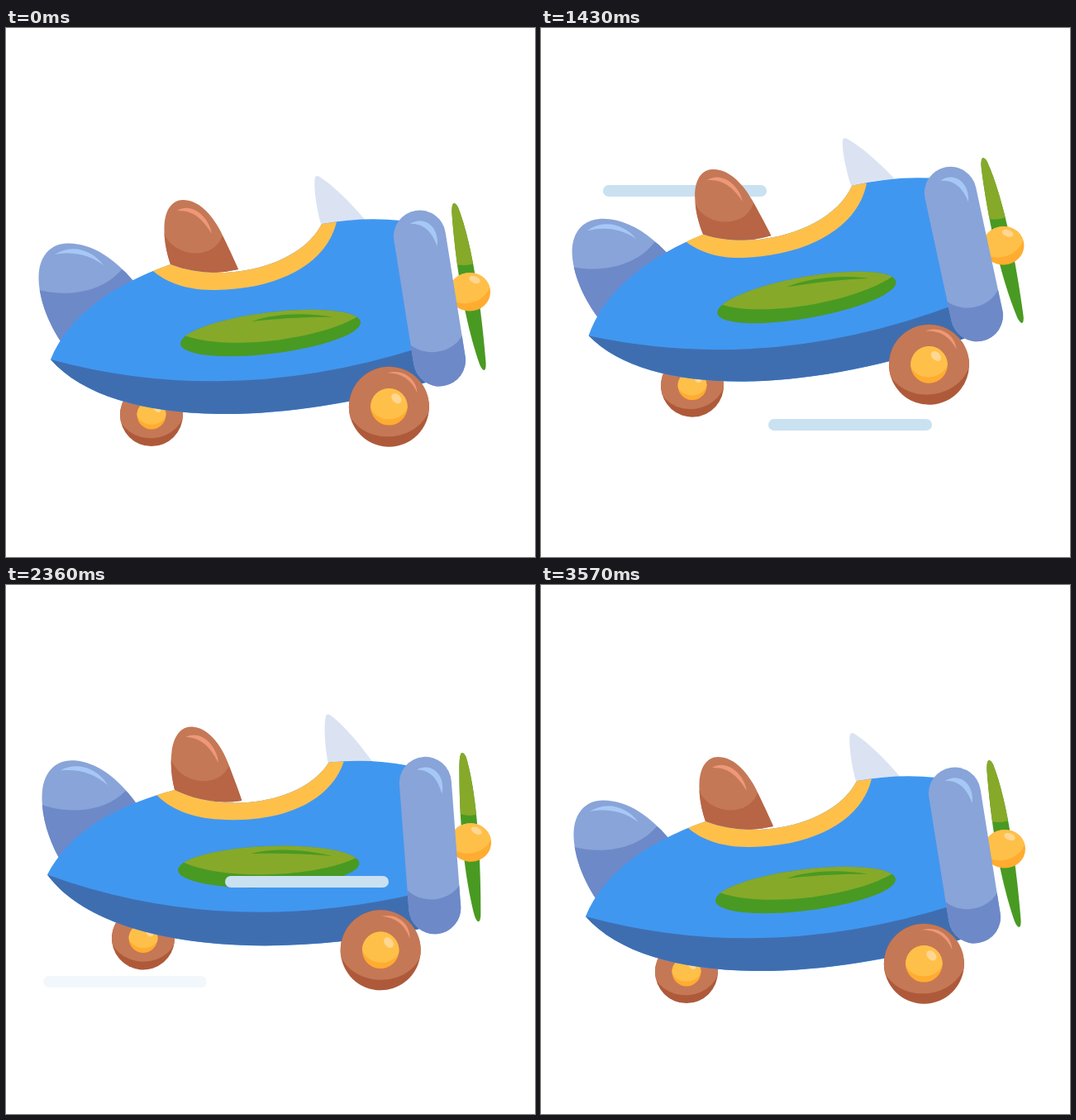
Animation, 640 px wide and 640 px high, one loop 3640 ms. Source, as an HTML page:

```html
<!DOCTYPE html>
<html lang="en">
<head>
<meta charset="utf-8">
<title>Toy plane</title>
<style>
  html, body { margin: 0; width: 100%; height: 100%; overflow: hidden; background: #fff; }
  svg { display: block; width: 100vw; height: 100vh; }
  .sky { fill: #4097f0; } .navy { fill: #3f6eb0; }
  .haze { fill: #89a4d8; } .dusk { fill: #6e89c8; } .shine { fill: #a6c8f6; }
  .clay { fill: #c57855; } .rust { fill: #b76545; } .tyre { fill: #ae5a3a; } .blush { fill: #ee9878; }
  .gold { fill: #ffc04a; } .amber { fill: #ffac30; } .cream { fill: #ffd792; }
  .lime { fill: #86a92a; } .leaf { fill: #499a22; }
  .dash { stroke: #c9e1f1; stroke-width: 14; stroke-linecap: round; }
</style>
</head>
<body>
<svg viewBox="0 0 640 640">
  <defs>
    <path id="fin" d="M66 379C50 355 39 325 39.5 300C40 276 54 260.5 75 260.5C105 260.5 132 280 154 306L110 350Z"/>
    <path id="seat" d="M199 286C194 272 191 255 191.5 241C192 220 201 208 214 208C238 208 255 235 263 253C270 268 276 280 281 292Q238 302 199 286Z"/>
    <path id="blade" d="M541 212.5Q544 211 547 217C562 255 574 325 580.5 405Q581 413 578.5 414Q576 414 573 407C560 370 546 310 539.5 225Q539 215 541 212.5Z"/>
    <ellipse id="hub" cx="561" cy="319.3" rx="25" ry="23.3"/>
    <ellipse id="wing" cx="320" cy="369" rx="109.8" ry="25" transform="rotate(-7 320 369)"/>
    <clipPath id="inFin"><use href="#fin"/></clipPath>
    <clipPath id="inSeat"><use href="#seat"/></clipPath>
    <clipPath id="inBlade"><use href="#blade"/></clipPath>
    <clipPath id="inHub"><use href="#hub"/></clipPath>
    <clipPath id="inWing"><use href="#wing"/></clipPath>
    <clipPath id="inNose"><rect x="-31.5" y="-31.5" width="63" height="214.9" rx="31.5" transform="translate(500.5 252) rotate(-9.09)"/></clipPath>
    <clipPath id="inTyre"><circle r="48.5"/></clipPath>
    <clipPath id="inCap"><circle r="22.3"/></clipPath>
    <g id="wheel">
      <circle class="tyre" r="48.5"/>
      <ellipse class="clay" cy="-9" rx="52" ry="45" transform="rotate(-4)" clip-path="url(#inTyre)"/>
      <path class="blush" d="M-2 -41C15 -41 27 -33 34 -17C34 -33 17 -47 -2 -41Z"/>
      <circle class="amber" r="22.3"/>
      <g clip-path="url(#inCap)"><ellipse class="gold" cy="-6" rx="24" ry="21"/></g>
      <ellipse class="cream" cx="9" cy="-10" rx="7" ry="5" transform="rotate(45 9 -10)"/>
    </g>
  </defs>

  <path class="dash" d="M7 197H191"/>
  <path class="dash" d="M7 480H191"/>

  <g id="plane">
    <path fill="#b8c8e6" opacity=".5" d="M381 237C376 220 371.500 190 374 181Q375 177.500 380 180.500C395 190 415 209 434 231.500Q410 232 381 237Z"/>
    <use href="#fin" class="haze"/>
    <path class="dusk" clip-path="url(#inFin)" d="M40 317C70 325 115 322 140 292L170 310L70 390L30 380Z"/>
    <path class="shine" d="M59 274C82 270 100 274 118 287C105 269 80 260 59 274Z"/>
    <use href="#seat" class="clay"/>
    <path class="rust" clip-path="url(#inSeat)" d="M191 247C200 276 250 284 262 251L290 300H190Z"/>
    <path class="blush" d="M207 221C226 220 238 231 249 249C246 229 225 210 207 221Z"/>
    <use href="#wheel" transform="translate(176 468) scale(.784)"/>

    <path class="sky" d="M54 401C75 350 125 312 199 286C260 310 355 290 382 237Q432 228 478 233L508 429C320 485 125 482 54 401Z"/>
    <path class="navy" d="M54 401Q270 460 500 387L510 428C320 485 125 482 54 401Z"/>
    <path class="gold" d="M178 294Q188 289.500 199 286C260 310 355 290 382 237L400 234.500C388 285 330 317 250 317C215 317 192 306 178 294Z"/>

    <use href="#wing" class="leaf"/>
    <path class="lime" clip-path="url(#inWing)" d="M211 370C260 392 380 378 427 348V300H200Z"/>
    <path class="leaf" d="M297 355C325 345 365 344 396 350C365 349 325 352 297 355Z"/>

    <use href="#blade" class="leaf"/>
    <path class="lime" clip-path="url(#inBlade)" d="M530 200H570V283Q558 290 540 285Z"/>
    <use href="#hub" class="amber"/>
    <g clip-path="url(#inHub)"><ellipse class="gold" cx="557" cy="310" rx="29" ry="23" transform="rotate(-9 557 310)"/></g>
    <ellipse class="cream" cx="567" cy="304.500" rx="7" ry="4" transform="rotate(22 567 304.500)"/>

    <g clip-path="url(#inNose)">
      <path class="haze" d="M460 210H570V440H460Z"/>
      <path class="dusk" d="M488 382C505 398 540 396 553 370L570 440H480Z"/>
    </g>
    <path class="shine" d="M489 237C504 236 515 245 521.500 264C525 240 505 226 489 237Z"/>
    <use href="#wheel" transform="translate(463.400 458.300)"/>
  </g>

  <path class="dash" d="M7 359H191"/>
</svg>
<script>
const LOOP = 3640, FPS = 14, STEPS = 50, LAST = 89;
const plane = document.getElementById('plane');
const dashes = [...document.querySelectorAll('.dash')];
const dashStart = [0, 20, 42];

// key: [time, value, easing towards the next key]
const tilt = [
  [0, 0, [.333, .333, .667, 1]],
  [21.5, -6.1, [.25, 0, .75, 1]],
  [66, 6.1, [.333, 0, .667, .6]],
  [LAST, 0]
];
const lift = [
  [0, 0, [.29, 0, .667, 1]],
  [44, -48, [.28, 0, .33, 1]],
  [LAST, 0]
];

const cubic = (a, b, t) => 3 * (1 - t) * (1 - t) * t * a + 3 * (1 - t) * t * t * b + t * t * t;

function ease([x1, y1, x2, y2], u) {
  let lo = 0, hi = 1;
  for (let i = 0; i < 24; i++) {
    const mid = (lo + hi) / 2;
    if (cubic(x1, x2, mid) < u) lo = mid; else hi = mid;
  }
  return cubic(y1, y2, lo);
}

function valueAt(keys, s) {
  let i = 0;
  while (i < keys.length - 2 && s >= keys[i + 1][0]) i++;
  const [t0, v0, curve] = keys[i], [t1, v1] = keys[i + 1];
  return v0 + (v1 - v0) * ease(curve, (s - t0) / (t1 - t0));
}

const clamp = v => Math.max(0, Math.min(1, v));

function draw(ms) {
  const step = Math.min(STEPS, Math.floor((ms + 5) * FPS / 1000));
  const s = Math.floor(step * LAST / STEPS);
  plane.setAttribute('transform',
    `translate(0 ${valueAt(lift, s)}) rotate(${valueAt(tilt, s)} 320 342)`);
  dashes.forEach((dash, i) => {
    const age = s - dashStart[i];
    dash.setAttribute('transform', `translate(${425 - 10 * age} 0)`);
    dash.setAttribute('opacity', Math.min(clamp(age / 9), clamp((39 - age) / 4)));
  });
}

const start = performance.now();
function tick() {
  draw((performance.now() - start) % LOOP);
  requestAnimationFrame(tick);
}
tick();
</script>
</body>
</html>
```
